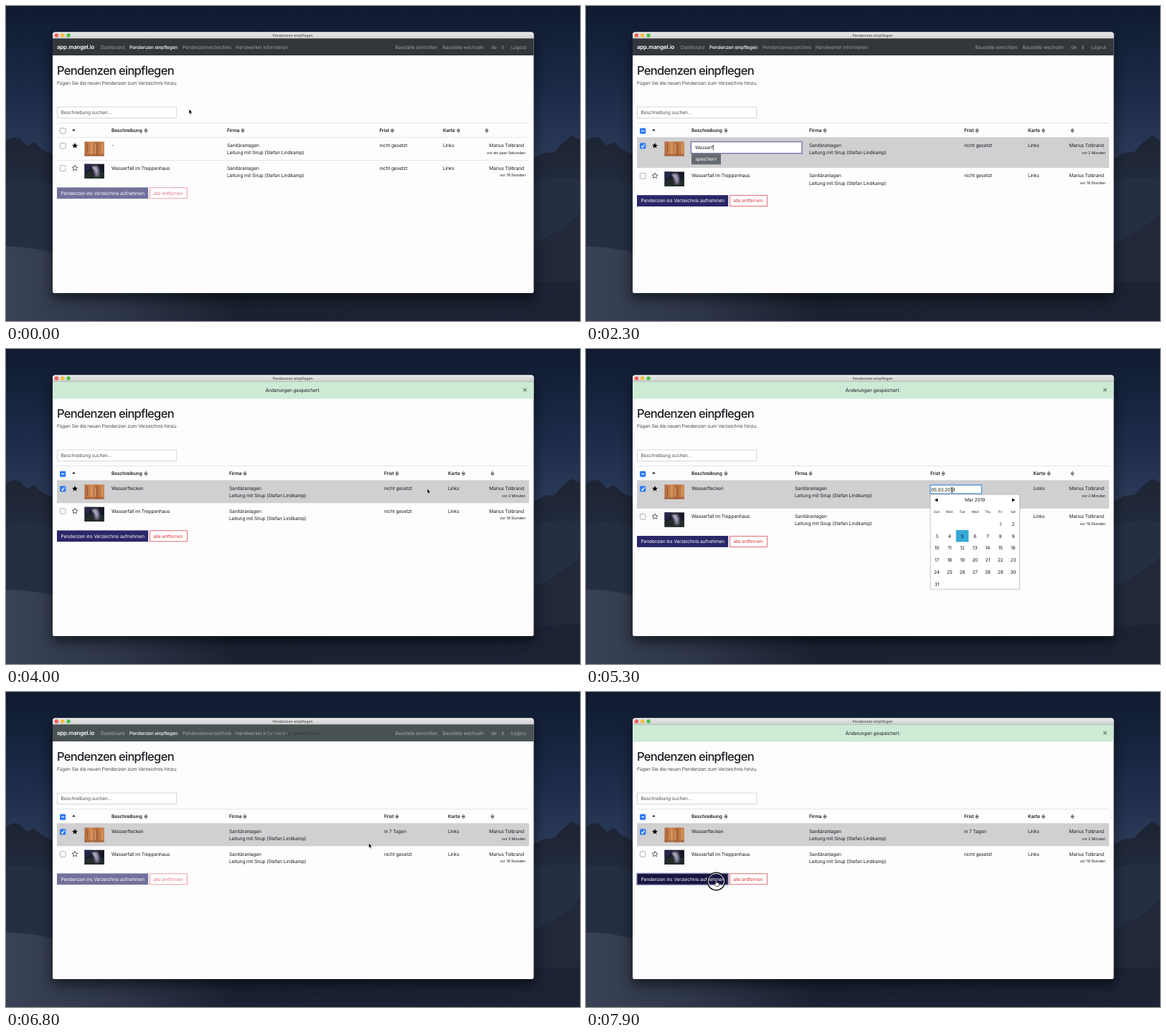
An HTML page that plays this animation: 800 px wide and 440 px high, repeating every 8 s.

```html
<!DOCTYPE html>
<html lang="de">
<head>
<meta charset="utf-8">
<title>Pendenzen einpflegen</title>
<style>
  html, body { margin: 0; width: 100%; height: 100%; overflow: hidden; background: #1b2439; }
  svg { display: block; width: 800px; height: 440px; }
  text {
    font: 400 6.65px Inter, Roboto, sans-serif;
    font-optical-sizing: none;
    letter-spacing: -.022em;
    text-rendering: geometricPrecision;
    fill: #1b1e22;
    white-space: pre;
  }
  .h1 { font-size: 16.6px; font-weight: 500; letter-spacing: -.045em; }
  .bar { font-size: 5.3px; letter-spacing: 0; fill: #3f3f3f; }
  .brand { font-size: 7.9px; font-weight: 600; fill: #fff; }
  .nav { fill: #9b9ea1; }
  .active { font-weight: 500; letter-spacing: -.03em; fill: #fff; }
  .lead { fill: #44494f; }
  .hint { fill: #4d5359; }
  .th { font-weight: 600; }
  .small { font-size: 5.3px; }
  .light { fill: #fff; }
  .red { fill: #d9393d; }
  .mid { text-anchor: middle; }
  .end { text-anchor: end; }
  .week { font-size: 4.6px; letter-spacing: 0; }
  .close { font-size: 10px; font-weight: 700; fill: #5d8b69; }
</style>
</head>
<body>
<svg viewBox="0 0 800 440" xmlns="http://www.w3.org/2000/svg">
  <defs>
    <linearGradient id="sky" x2="0" y2="1">
      <stop offset="0" stop-color="#101b30"/>
      <stop offset=".25" stop-color="#1a2945"/>
      <stop offset=".48" stop-color="#2b3a58"/>
      <stop offset=".7" stop-color="#2a354c"/>
      <stop offset="1" stop-color="#1b2335"/>
    </linearGradient>
    <linearGradient id="rock" x2="0" y2="1">
      <stop offset="0" stop-color="#1d2433"/>
      <stop offset="1" stop-color="#222c40"/>
    </linearGradient>
    <linearGradient id="dune">
      <stop offset="0" stop-color="#394256"/>
      <stop offset=".2" stop-color="#2d3548"/>
      <stop offset=".4" stop-color="#1a2132"/>
      <stop offset="1" stop-color="#1c2335"/>
    </linearGradient>
    <linearGradient id="bar" x2="0" y2="1">
      <stop offset="0" stop-color="#ebeaeb"/>
      <stop offset="1" stop-color="#d0cfd0"/>
    </linearGradient>
    <linearGradient id="wood">
      <stop offset="0" stop-color="#b0693c"/>
      <stop offset=".35" stop-color="#d18b55"/>
      <stop offset=".6" stop-color="#b56a3b"/>
      <stop offset="1" stop-color="#cf8a58"/>
    </linearGradient>
    <filter id="soft" x="-10%" y="-10%" width="120%" height="130%"><feGaussianBlur stdDeviation="8"/></filter>
    <filter id="blur"><feGaussianBlur stdDeviation="1"/></filter>
    <g id="sort" fill="none" stroke="#333" stroke-width=".7">
      <path d="M-1.9-.5 0-3 1.9-.5ZM-1.9.5 0 3 1.9 .5Z"/>
    </g>
    <path id="star" d="M0-4 1.15-1.3 4-1.1 1.8.75 2.5 3.5 0 2-2.5 3.5-1.8.75-4-1.1-1.15-1.3Z"/>
    <g id="arrow"><path d="M0 0V6.8L1.6 5.4 2.6 7.7 3.8 7.2 2.8 4.9H4.9Z" fill="#000" stroke="#fff" stroke-width=".6"/></g>
    <g id="beam" fill="none" stroke="#222" stroke-width=".7">
      <path d="M-1.5-3.8Q0-3.8 0-2.8 0-3.8 1.5-3.8M0-2.8V2.8M-1.5 3.8Q0 3.8 0 2.8 0 3.8 1.5 3.8M-.8.9H.8"/>
    </g>
    <g id="hand">
      <path d="M-.7 0Q0-.8.7 0V2.8L3.6 3.4Q4.4 3.8 4.2 5L3.4 8H-.6L-2.7 5Q-2.8 4-1.8 4.3L-.7 5Z" fill="#fff" stroke="#000" stroke-width=".6"/>
    </g>
  </defs>

  <rect width="800" height="440" fill="url(#sky)"/>
  <g id="stars" fill="#a9b8d4"></g>
  <path d="M0 188 10 183 18 184 29 195 39 190 50 200 66 208 300 240 520 240 734 214 750 205 764 204 776 191 789 181 800 187V262H0Z" fill="url(#rock)"/>
  <path d="M0 245Q30 238 66 250L400 280 735 246Q770 236 800 242V340H0Z" fill="#252f44"/>
  <path d="M800 290Q765 325 700 345L0 360V440H800Z" fill="#202839"/>
  <path d="M0 336Q45 336 90 352 190 385 300 396L800 385V440H0Z" fill="url(#dune)"/>
  <rect x="63" y="44" width="674" height="366" rx="5" fill="#000" opacity=".5" filter="url(#soft)"/>
  <path d="M65 401V40Q65 36.5 68.5 36.5H732Q735.5 36.5 735.5 40V398.5Q735.5 401 733 401H67.5Q65 401 65 398.5Z" fill="#fdfdfe"/>
  <path d="M65 45.5V40Q65 36.5 68.5 36.5H732Q735.5 36.5 735.5 40V45.5Z" fill="url(#bar)"/>
  <circle cx="70.4" cy="41" r="2.7" fill="#f25d55"/>
  <circle cx="78.7" cy="41" r="2.7" fill="#f5bd3e"/>
  <circle cx="87.1" cy="41" r="2.7" fill="#4bc546"/>
  <rect x="65" y="45.3" width="670.5" height="23.7" fill="#32373c"/>
  <g id="page"></g>
  <g id="live"></g>
</svg>
<script>
const LOOP = 8000, STEP = 100;
const WORD = 'Wasserflecken';
const FIRM = 'Leitung mit Sirup (Stefan Lindkamp)';
const PERSON = 'Marius Tolbrand';

// Column starts: company, deadline, plan, author
const COLS = {
  fresh: [308, 520.5, 609, 668],
  ready: [311, 527, 616, 676],
  date: [291, 480, 623.5, 676]
};
// time, x, y of the pointer tip
const PATH = [
  [0, 255, 144], [500, 79, 194], [700, 79, 194], [900, 149.5, 194.5], [3500, 149.5, 194.5],
  [4000, 587, 195], [4300, 545, 195], [4500, 540, 196], [4900, 510, 197], [5300, 510, 197],
  [5700, 524, 276], [5900, 524, 276], [6300, 505.5, 211], [6900, 505.5, 211],
  [7500, 181.5, 263.5], [8000, 181.5, 263.5]
];
const CLICKS = [500, 900, 4300, 5700, 6400, 7800];

const $ = id => document.getElementById(id);
const within = (t, a, b) => t >= a && t < b;
const clamp = v => Math.max(0, Math.min(1, v));
const text = (x, y, s, cls = '') => `<text x="${x}" y="${y}" class="${cls}">${s}</text>`;
const rect = (x, y, w, h, fill, more = '') =>
  `<rect x="${x}" y="${y}" width="${w}" height="${h}" fill="${fill}" ${more}/>`;
const use = (id, x, y, more = '') => `<use href="#${id}" x="${x}" y="${y}" ${more}/>`;
const line = y => rect(71, y, 658, .8, '#dcdfe3');

function drawStars() {
  let seed = 7, out = '';
  const rnd = () => (seed = seed * 16807 % 2147483647) / 2147483647;
  for (let i = 0; i < 90; i++)
    out += `<circle cx="${rnd() * 800}" cy="${rnd() * 175}" r="${.2 + rnd() * .3}" opacity="${rnd() * .6}"/>`;
  $('stars').innerHTML = out;
}

function drawPage() {
  const nav = [[132, 'Dashboard'], [246, 'Pendenzenverzeichnis'], [320, 'Handwerker informieren'],
    [542.5, 'Baustelle einrichten'], [608.5, 'Baustelle wechseln'], [676, 'de'], [690.5, 'it'], [704, 'Logout']];
  $('page').innerHTML =
    text(399.6, 43, 'Pendenzen einpflegen', 'bar mid') +
    text(71, 60, 'app.mangel.io', 'brand') +
    text(172, 59.7, 'Pendenzen einpflegen', 'active') +
    nav.map(([x, s]) => text(x, 59.7, s, 'nav')).join('') +
    text(71, 96, 'Pendenzen einpflegen', 'h1') +
    text(71, 110.3, 'Fügen Sie die neuen Pendenzen zum Verzeichnis hinzu.', 'lead') +
    rect(71.4, 141, 166.4, 15.5, '#fff', 'stroke="#c9cdd2" stroke-width=".8"') +
    text(76.5, 151.2, 'Beschreibung suchen...', 'hint') +
    line(163.1) + line(183) +
    '<path d="M92.2 174.3 94.4 171.8 96.6 174.3Z"/>' +
    text(147, 176.3, 'Beschreibung', 'th') + use('sort', 195, 174);
}

function checkbox(y, mark) {
  if (!mark) return rect(75.4, y, 7.6, 7.6, '#fff', 'rx="1.6" stroke="#8d8d90" stroke-width=".7"');
  const d = mark === 'some' ? `M77.2 ${y + 3.8}h4` : `M77.2 ${y + 4}l1.5 1.8 2.7-4`;
  return rect(75, y - .3, 8.3, 8.3, '#2f7bf3', 'rx="1.6"') +
    `<path d="${d}" fill="none" stroke="#fff" stroke-width="1.2"/>`;
}

function woodThumb(y) {
  let out = rect(109.5, y, 27.5, 20.3, 'url(#wood)');
  [[113, '#8f4d2a'], [119, '#e0a876'], [124, '#d9b08b'], [126.5, '#93512e'], [133, '#e0a577']].forEach(([x, c], i) => {
    out += rect(x, y + 2 + i % 3, 1.3, 13 + i % 2 * 3, c, 'opacity=".7"');
  });
  return out + rect(109.5, y + 17.3, 27.5, 3, '#9a5a38', 'opacity=".6"');
}

function fallThumb(y) {
  return rect(109.5, y, 27.5, 20.3, '#171927') +
    `<g transform="translate(109.5 ${y})">
      <path d="M0 20.3V13L9 9 19 13 27.5 10V20.3Z" fill="#232c2b"/>
      <path d="M0 0H10L6 9 0 11Z" fill="#24264a"/>
      <path d="M10 3 18 2 21 9 20 17 15 18 13 10Z" fill="#77718f" filter="url(#blur)"/>
      <path d="M10 3.5 16 4 18 10 17 15 15 10Z" fill="#c9c5d4" opacity=".75" filter="url(#blur)"/>
    </g>`;
}

function row(y, cols, { desc, due, ago }) {
  return text(147, y + 2.3, desc) +
    text(cols[0], y + 2.3, 'Sanitäranlagen') + text(cols[0], y + 12.4, FIRM) +
    text(cols[1], y + 2.3, due) + text(cols[2], y + 2.2, 'Links') +
    text(722, y + 2.2, PERSON, 'end') + text(724, y + 12, ago, 'small end');
}

function saveButton(x, y) {
  return rect(x, y, 41, 15.2, '#666a71') + text(x + 5.2, y + 9.9, 'speichern', 'light');
}

function calendar(day) {
  const cx = i => 489 + 17.72 * i;
  let out = rect(480, 203.2, 124.4, 132.6, '#fff', 'stroke="#b5b8bc" stroke-width=".8"') +
    '<path d="M490.2 208.6V213.6L485.8 211.1ZM593.8 208.6V213.6L598.2 211.1Z"/>' +
    text(542, 213.4, 'Mar 2019', 'mid');
  ['Sun', 'Mon', 'Tue', 'Wed', 'Thu', 'Fri', 'Sat'].forEach((s, i) => out += text(cx(i), 229.4, s, 'week mid'));
  for (let d = 1; d <= 31; d++) {
    const cell = d + 4, x = cx(cell % 7), y = 244.4 + 16.75 * Math.floor(cell / 7);
    if (d === day) out += rect(x - 8.8, y - 8.3, 17.6, 16.6, '#35a9d8');
    out += text(x, y + 2.4, d, 'mid');
  }
  return out;
}

function actions(y, off, hover) {
  const focus = hover ? 'stroke="#8582ad" stroke-width="1.4"' : '';
  return `<g opacity="${off ? .65 : 1}">` +
    rect(71, y, 127.2, 15.8, hover ? '#171540' : '#2a2768', focus) +
    text(76.5, y + 10.2, 'Pendenzen ins Verzeichnis aufnehmen', 'light') +
    rect(200.4, y + .4, 52, 15, '#fff', 'stroke="#dc4b4f" stroke-width=".8"') +
    text(205.3, y + 10.2, 'alle entfernen', 'red') + '</g>';
}

function alertBar(alpha) {
  return `<g opacity="${alpha}">` + rect(65, 45.3, 670.5, 24.2, '#cdead4') +
    text(399.8, 59.8, 'Änderungen gespeichert.', 'mid') + text(723.4, 60.3, '×', 'close mid') + '</g>';
}

function pointerAt(t) {
  const i = PATH.findIndex(k => k[0] > t);
  const [t0, x0, y0] = PATH[i - 1], [t1, x1, y1] = PATH[i];
  const p = (t - t0) / (t1 - t0), e = p * p * (3 - 2 * p);
  return [x0 + (x1 - x0) * e, y0 + (y1 - y0) * e];
}

function pointer(t) {
  if (within(t, 1300, 3600)) return '';
  const [x, y] = pointerAt(t);
  const beam = within(t, 900, 1300) || within(t, 4400, 5400);
  const hand = within(t, 6200, 6500) || t >= 7400;
  const ring = CLICKS.some(c => within(t, c, c + 200))
    ? `<g fill="none" transform="translate(${x} ${y + 1})"><circle r="12.2" stroke="#15161c" stroke-width="1.5"/>
       <circle r="11" stroke="#fff" stroke-width=".9"/></g>` : '';
  return ring + use(beam ? 'beam' : hand ? 'hand' : 'arrow', x, y);
}

function draw(t) {
  const checked = t >= 600;
  const naming = within(t, 1000, 3500);
  const dating = within(t, 4400, 6500);
  const saving = within(t, 3500, 3700) || within(t, 6500, 7000);
  const cols = COLS[dating ? 'date' : checked ? 'ready' : 'fresh'];
  const shift = naming ? 10.8 : dating ? 7.6 : 0;
  const second = 226.3 + shift;
  const typed = WORD.slice(0, Math.max(0, Math.floor((t - 1300) / 165) + 1));
  const picked = t >= 5800;

  let out = ['Firma', 'Frist', 'Karte', ''].map((s, i) =>
    text(cols[i], 176.3, s, 'th') + use('sort', cols[i] + [22, 18, 21.5, 2][i], 174)).join('');
  out += checked ? rect(71, 183.6, 658, 31.7 + shift, '#d0cfd1') : line(215);
  out += checkbox(170.7, checked && 'some') + checkbox(191.6, checked && 'all') + checkbox(222.8 + shift, false);
  out += use('star', 96, 195) + use('star', 96, second, 'fill="none" stroke="#222" stroke-width=".7"');
  out += woodThumb(189.4) + fallThumb(220.7 + shift);
  out += row(195, cols, {
    desc: naming ? '' : t < 1000 ? '-' : WORD,
    due: dating ? '' : t >= 6500 ? 'in 7 Tagen' : 'nicht gesetzt',
    ago: checked ? 'vor 2 Minuten' : 'vor ein paar Sekunden'
  });
  out += row(second, cols, { desc: 'Wasserfall im Treppenhaus', due: 'nicht gesetzt', ago: 'vor 19 Stunden' });
  out += actions(253.4 + shift, !checked || saving, t >= 7400);

  if (naming) {
    out += rect(146.4, 189.6, 154.6, 16.2, '#fff', 'stroke="#817eae" stroke-width="1.5"') +
      `<text id="entry" x="152" y="200.2">${typed}</text>` +
      rect(152.2, 194, .7, 7.4, '#111', 'id="caret"') + saveButton(147, 206.2);
  }
  if (dating) {
    out += rect(479.8, 190, 71.6, 12, '#fff', 'stroke="#4d8fd6" stroke-width="1.3"') +
      text(481, 198.5, picked ? '12.03.2019' : '05.03.2019') +
      (t < 5900 ? calendar(picked ? 12 : 5) : saveButton(480, 203));
  }
  const fadeOut = 1 - clamp((t - 6640) / 190);
  const alpha = t < 6900 ? clamp((t - 3600) / 150) * fadeOut : clamp((t - 6950) / 150);
  if (alpha) out += alertBar(alpha);
  $('live').innerHTML = out + pointer(t);

  if (naming && typed) $('caret').setAttribute('x', 152.2 + $('entry').getComputedTextLength());
}

let shown = -1;
const start = performance.now();
function tick() {
  const t = Math.floor((performance.now() - start) % LOOP / STEP) * STEP;
  if (t !== shown) draw(shown = t);
  requestAnimationFrame(tick);
}
drawStars();
drawPage();
tick();
</script>
</body>
</html>
```
